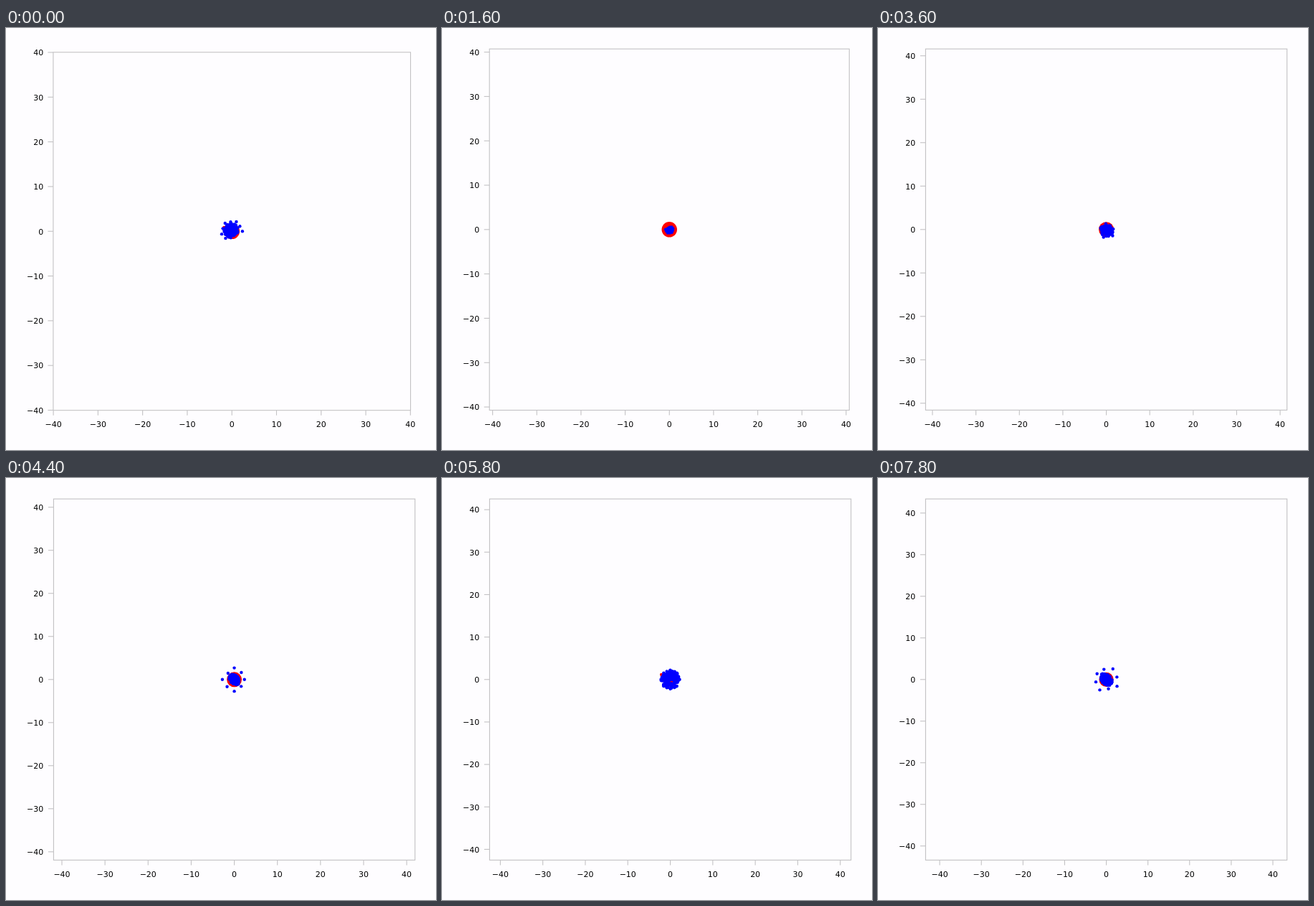
An HTML page for the animation above (8000 ms loop, 600x588 px).

```html
<!DOCTYPE html>
<html lang="en">
<head>
<meta charset="utf-8">
<title>Oscillating cloud</title>
<style>
  html, body { margin: 0; width: 100%; height: 100%; overflow: hidden; background: #fefdff; }
  svg { display: block; width: 100%; height: 100%; }
  text { font: 11px "DejaVu Sans", sans-serif; fill: #000; }
  .line { fill: none; stroke: #c3c2c4; stroke-width: 1.1; }
</style>
</head>
<body>
<svg id="stage" viewBox="0 0 600 588"></svg>
<script>
const STEP = 200, STEPS = 40;
const OMEGA = Math.PI / 13;
const KEYS = [0, 8, 13, 22, 29, 39];
const CLOUD = 125, STRAYS = 8, DOT = 2.2;
const svg = document.getElementById("stage");

function set(el, attrs) {
  for (const k in attrs) el.setAttribute(k, attrs[k]);
}

function add(tag, attrs, parent = svg) {
  const el = document.createElementNS("http://www.w3.org/2000/svg", tag);
  set(el, attrs);
  parent.appendChild(el);
  return el;
}

let seed = 20;
function rand() {
  seed = (seed * 16807) % 2147483647;
  return seed / 2147483647;
}

function polar(r, degrees) {
  const a = degrees * Math.PI / 180;
  return [r * Math.cos(a), r * Math.sin(a)];
}

// Scales a point separately along the two diagonals.
function diag([x, y], along, across) {
  const a = (x + y) / 2 * along, b = (x - y) / 2 * across;
  return [a + b, a - b];
}

// One pose for each key step; the first half swing is a pure cosine.
function poses(start, ...later) {
  const swing = KEYS.slice(0, 3).map(n => diag(start, Math.cos(OMEGA * n), Math.cos(OMEGA * n)));
  return [...swing, ...later];
}

// Harmonic interpolation between neighbouring poses.
function place(path, n) {
  let i = 0;
  while (i < KEYS.length - 2 && n >= KEYS[i + 1]) i++;
  const a = KEYS[i], b = KEYS[i + 1], s = Math.sin(OMEGA * (b - a));
  const u = Math.sin(OMEGA * (b - n)) / s, v = Math.sin(OMEGA * (n - a)) / s;
  return [0, 1].map(k => path[i][k] * u + path[i + 1][k] * v);
}

// A disc of dots without its lower right edge, which later fills out.
function cloudPath() {
  let x, y, angle;
  do {
    angle = rand() * 360;
    [x, y] = polar(10.3 * Math.sqrt(rand()), angle);
    x -= 0.8;
    y -= 1;
  } while (x * 0.6 + y * 0.8 > 6.5);
  const wide = polar(12.7 * Math.sqrt(rand()), angle + (rand() - 0.5) * 140);
  return poses([x, y], diag(wide, 0.68, 0.47), wide, diag(wide, -0.78, -0.52));
}

// Outer dots: a wide fan that spreads to a full ring.
function strayPath(_, i) {
  const late = 90 + 45 * i;
  const far = 12 + rand() * 5;
  return poses(
    polar(13.2 + 1.5 * (i % 2), 132 + 32.6 * i),
    polar(far, late),
    polar(13, late),
    polar(far + 1, late + 212)
  );
}

const redPath = poses(polar(12.2, 206), polar(7, 206), polar(14.2, 209), polar(8, 30));
const paths = [
  ...Array.from({ length: CLOUD }, cloudPath),
  ...Array.from({ length: STRAYS }, strayPath)
];

const ticks = [];
for (let v = -40; v <= 40; v += 10) {
  const tick = {
    v,
    x: add("path", { class: "line" }),
    y: add("path", { class: "line" }),
    xText: add("text", { "text-anchor": "middle", y: 556 }),
    yText: add("text", { "text-anchor": "end", x: 52.3 })
  };
  tick.xText.textContent = tick.yText.textContent = String(v).replace("-", "\u2212");
  ticks.push(tick);
}
const frame = add("rect", { class: "line" });
const group = add("g", {});
const disc = add("circle", { fill: "#f00" }, group);
const redDot = add("circle", { fill: "#f00", r: DOT }, group);
const dots = paths.map(() => add("circle", { fill: "#00f", r: DOT }, group));

function moveTo(el, [x, y]) {
  set(el, { cx: x.toFixed(2), cy: y.toFixed(2) });
}

function draw(n) {
  const grow = Math.min(n / 13, 1);
  const left = 65.9 + 0.5 * grow, right = 564.5 + 6.2 * grow;
  const top = 33.8 - 0.58 * Math.min(n, 8), bottom = 532.7 - 0.3 * grow;
  const range = 40.03 + 0.0862 * n;
  const cx = (left + right) / 2, cy = (top + bottom) / 2;
  const sx = (right - left) / 2 / range, sy = (bottom - top) / 2 / range;

  set(frame, { x: left, y: top, width: right - left, height: bottom - top });
  for (const t of ticks) {
    const x = cx + t.v * sx, y = cy - t.v * sy;
    set(t.x, { d: `M${x} ${bottom}v7` });
    set(t.y, { d: `M${left} ${y}h-7.5` });
    set(t.xText, { x });
    set(t.yText, { y: y + 4.3 });
  }

  set(group, { transform: `translate(${cx} ${cy})` });
  set(disc, { r: 1.74 * sx });
  moveTo(redDot, place(redPath, n));
  dots.forEach((dot, i) => moveTo(dot, place(paths[i], n)));
}

const begin = performance.now();
let shown = -1;
function tick() {
  const n = Math.floor((performance.now() - begin) / STEP) % STEPS;
  if (n !== shown) draw(shown = n);
  requestAnimationFrame(tick);
}
tick();
</script>
</body>
</html>
```
